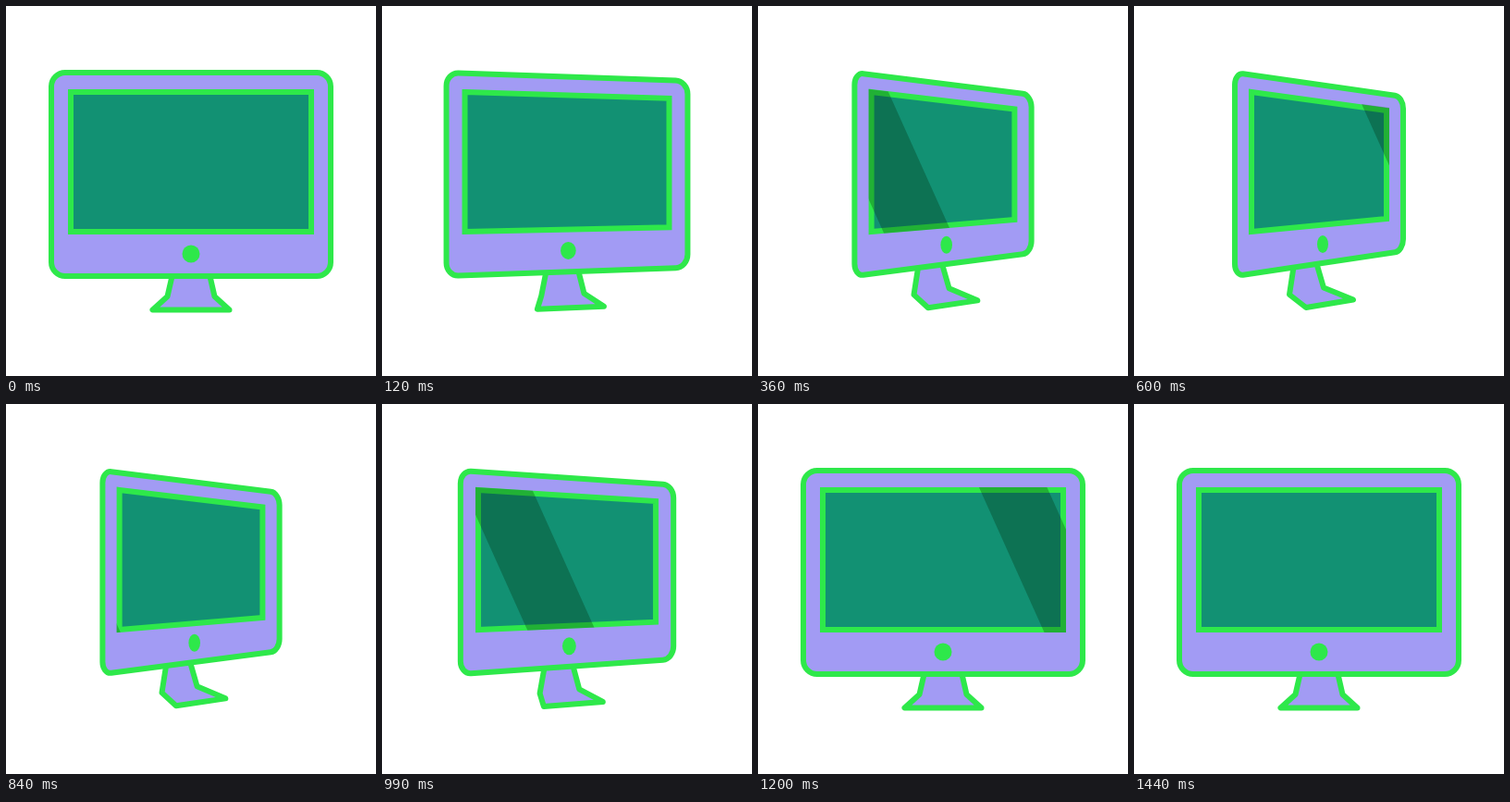
Animation of 400x400 px, one loop 4620 ms. Source, as an HTML page:

```html
<!DOCTYPE html>
<html lang="en">
<head>
<meta charset="utf-8">
<title>Turning monitor</title>
<style>
  html, body { margin: 0; width: 100%; height: 100%; overflow: hidden; background: #fff; }
  svg { display: block; width: 100%; height: 100%; }
  .line { stroke: #2ee84a; stroke-width: 6; stroke-linejoin: round; }
  .case { fill: #a29bf4; }
  #screen { fill: #129173; stroke-linejoin: miter; }
</style>
</head>
<body>
<svg viewBox="0 0 400 400">
  <clipPath id="glass"><path id="edge"/></clipPath>
  <path id="stand" class="line case"/>
  <path id="body" class="line case"/>
  <path id="screen" class="line"/>
  <ellipse id="button" fill="#2ee84a" ry="9.5"/>
  <g clip-path="url(#glass)" fill="#002300" fill-opacity=".28">
    <path id="shine1" d="M-6 80h73.5l81 180h-73.5z"/>
    <path id="shine2" d="M-6 80h73.5l81 180h-73.5z"/>
  </g>
</svg>
<script>
const LOOP = 4620, STEP = 30, END = 1440;
const TURN = 450, MIDDLE = 600, SWEEP = 600, SPEED = .72;
const $ = id => document.getElementById(id);
const mix = (a, b, p) => a + (b - a) * p;
const between = (a, b, p) => [mix(a[0], b[0], p), mix(a[1], b[1], p)];
const polygon = points => "M" + points.join("L") + "Z";

// Left half of the stand facing front, mirrored for the right half
const half = [[180, 290], [174.5, 314], [158.5, 328.5]];
const front = [...half, ...half.map(([x, y]) => [400 - x, y]).reverse()];
const turned = [[173, 279], [168, 312], [186, 326], [237, 317.5], [205, 304.5], [197, 277]];

// Four corners; both sides move in by `inset`, the far side also gets shorter
function panel(width, top, bottom, inset, drop, rise) {
  const x = width / 2 - inset;
  return [[200 - x, top], [200 + x, top + drop], [200 + x, bottom - rise], [200 - x, bottom]];
}

// Rounds the corners; rx applies along top and bottom, ry along the sides
function rounded(points, rx, ry) {
  const cut = (a, b, r) => between(a, b, r / Math.hypot(b[0] - a[0], b[1] - a[1]));
  return points.map((c, i) => {
    const before = points[(i + 3) % 4], after = points[(i + 1) % 4];
    const a = cut(c, before, i % 2 ? rx : ry), b = cut(c, after, i % 2 ? ry : rx);
    return `${i ? "L" : "M"}${a}C${between(a, c, .55)} ${between(b, c, .55)} ${b}`;
  }).join("") + "Z";
}

// Cubic bezier (.167, .167, .667, 1)
function ease(x) {
  if (x >= 1) return 1;
  const curve = (s, a, b) => 3 * s * (1 - s) ** 2 * a + 3 * s * s * (1 - s) * b + s ** 3;
  let low = 0, high = 1;
  for (let i = 0; i < 24; i++) {
    const s = (low + high) / 2;
    if (curve(s, .167, .667) < x) low = s; else high = s;
  }
  return curve(low, .167, 1);
}

function draw(time) {
  const t = Math.min(END, Math.floor((time % LOOP) / STEP) * STEP);
  const p = ease(Math.max(0, MIDDLE - Math.abs(t - MIDDLE)) / TURN);
  const body = panel(302, 72, 292, 60 * p, 26 * p, 27 * p);

  $("stand").setAttribute("d", polygon(front.map((a, i) => between(a, turned[i], p))));
  $("body").setAttribute("d", rounded(body, mix(15, 9, p), mix(15, 13, p)));
  $("screen").setAttribute("d", polygon(panel(260, 93, 244, 57 * p, 20 * p, 14 * p)));
  $("edge").setAttribute("d", polygon(panel(266, 90, 247, 57 * p, 20 * p, 14 * p)));

  $("button").setAttribute("cx", mix(200, 204, p));
  $("button").setAttribute("cy", mix(268, 257.5, p));
  $("button").setAttribute("rx", mix(9.5, 6, p));

  const x = 154 + (t - 480) * SPEED;
  $("shine1").setAttribute("transform", `translate(${x})`);
  $("shine2").setAttribute("transform", `translate(${x - SWEEP * SPEED})`);
}

const start = performance.now();
function tick() {
  draw(performance.now() - start);
  requestAnimationFrame(tick);
}
tick();
</script>
</body>
</html>
```
